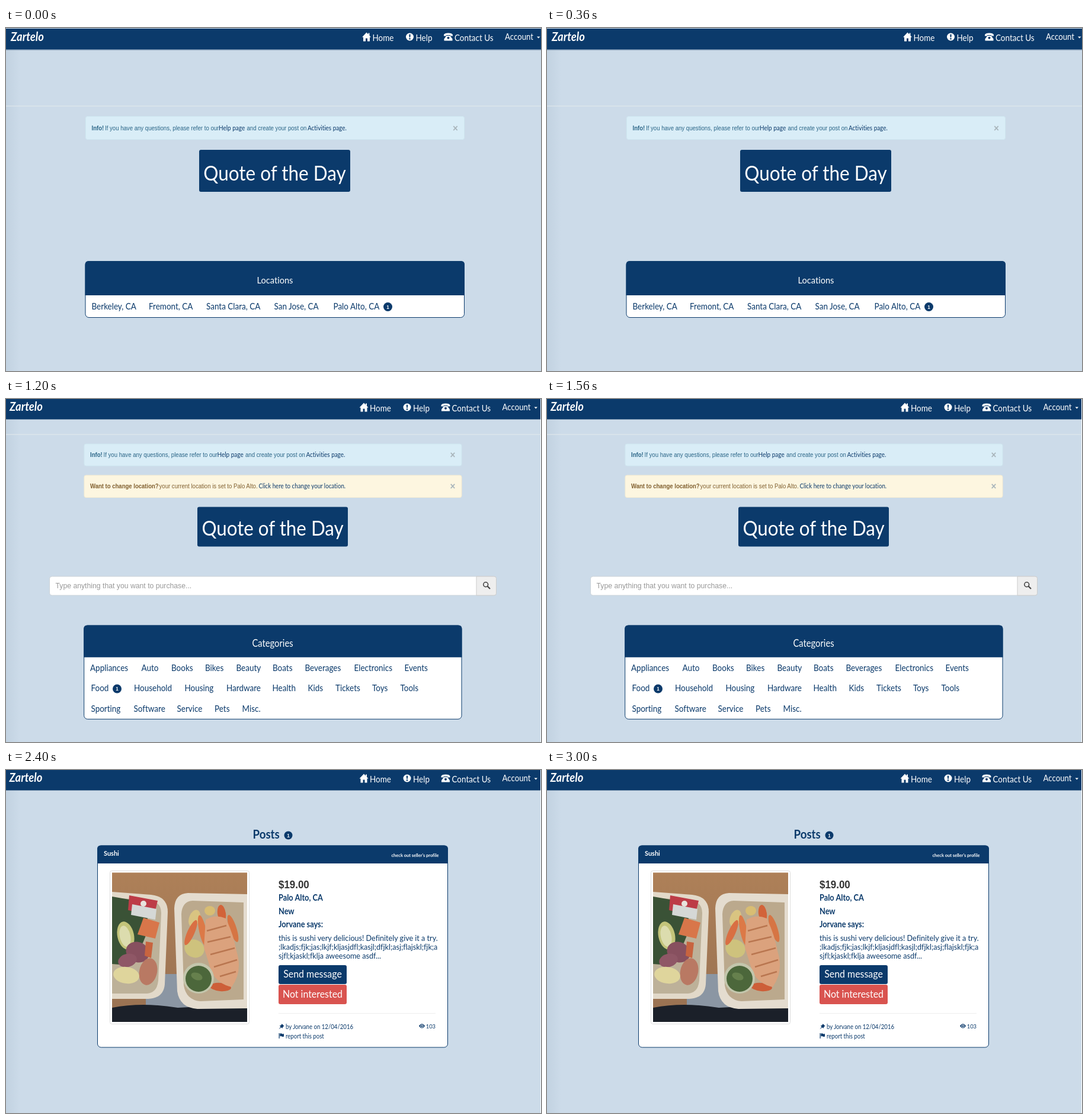
Write an HTML page that moves like this. It is 903 by 580 pixels and loops after 3.4 s.

```html
<!DOCTYPE html>
<html lang="en">
<head>
<meta charset="utf-8">
<title>Zartelo</title>
<style>
  html, body { margin: 0; width: 100%; height: 100%; overflow: hidden; background: #ccdbe9; }
  svg { display: block; width: 100%; height: 100%; }
  text { font-family: Lato, "Open Sans", sans-serif; font-variant-ligatures: none; white-space: pre; }
  .sans { font-family: "Liberation Sans", Arial, sans-serif; }
  .bold { font-weight: 700; }
  .brand { font-weight: 700; font-style: italic; }
  .mid { text-anchor: middle; }
  .end { text-anchor: end; }
  .scene { visibility: hidden; animation: turn 3400ms step-end infinite; }
  .scene.long { animation-name: long-turn; }
  @keyframes turn { 0% { visibility: visible; } 17.647%, 100% { visibility: hidden; } }
  @keyframes long-turn { 0% { visibility: visible; } 29.412%, 100% { visibility: hidden; } }
</style>
</head>
<body>
<svg id="stage" viewBox="0 0 903 580" preserveAspectRatio="none">
  <defs>
    <linearGradient id="shade">
      <stop offset="0" stop-color="#5f7890" stop-opacity=".09"/>
      <stop offset="1" stop-color="#5f7890" stop-opacity="0"/>
    </linearGradient>
    <linearGradient id="wood" x2="0" y2="1">
      <stop offset="0" stop-color="#ae8058"/>
      <stop offset="1" stop-color="#987152"/>
    </linearGradient>
    <clipPath id="photo"><rect x="179" y="173.5" width="228" height="252.5"/></clipPath>
  </defs>
</svg>
<script>
const NAVY = '#0b3a6b', WHITE = '#fff';
const SQUEEZE = 0.9; // the whole page is seen slightly narrowed

const rect = (x, y, w, h, fill, extra = '') =>
  `<rect x="${x}" y="${y}" width="${w}" height="${h}" fill="${fill}" ${extra}/>`;
const circle = (x, y, r, fill) => `<circle cx="${x}" cy="${y}" r="${r}" fill="${fill}"/>`;
const path = (d, fill, extra = '') => `<path d="${d}" fill="${fill}" ${extra}/>`;
const oval = (x, y, rx, ry, fill, turn = 0) =>
  `<ellipse rx="${rx}" ry="${ry}" fill="${fill}" transform="translate(${x} ${y}) rotate(${turn})"/>`;
const at = (x, y, body) => `<g transform="translate(${x} ${y})">${body}</g>`;
const text = (x, y, size, str, fill = NAVY, cls = '') =>
  `<text transform="translate(${x} ${y}) scale(${SQUEEZE} 1)" font-size="${size}" fill="${fill}" class="${cls}">${str}</text>`;
const words = (y, list, fill) => list.map(([x, str]) => text(x, y, 15, str, fill)).join('');
const badge = (x, y, r = 7.5) => circle(x, y, r, NAVY) + text(x, y + 3.2, 9, '1', WHITE, 'sans bold mid');

const house = path('M0 8L7.5 0L10.5 3.2V1H12.5V5.3L15 8H13V15H9V10H6V15H2V8Z', WHITE);
const notice = circle(6.5, 6.5, 6.5, WHITE) + path('M5.2 2.2H7.8L7.3 7.6H5.7Z', NAVY) + circle(6.5, 9.8, 1.3, NAVY);
const phone = path('M0 5V3Q1 0 7.5 0T15 3V5H11V3.5H4V5Z', WHITE) +
  path('M4.5 4.5H10.5L14.5 10V13H.5V10Z', WHITE) + circle(7.5, 8.3, 2, NAVY);
const lens = '<circle cx="4.7" cy="4.7" r="3.9" fill="none" stroke="#444" stroke-width="1.6"/>' +
  path('M7.5 7.5L12 12', 'none', 'stroke="#444" stroke-width="2.1"');
const pin = path('M5 0L9 4L7.8 4.6L6.3 6.6L6 8L4 6.2L0 9.5L3 5.2L1.2 3.2L3 3L4.8 1.3Z', NAVY);
const flag = path('M0 0H1.2V9H0ZM1.8 .8Q3.5 -.2 5.2 .9T8.5 .8V5.5Q7 6.5 5.2 5.5T1.8 5.5Z', NAVY);
const eye = path('M0 4Q5 -3.5 10 4Q5 11 0 4Z', NAVY) + circle(5, 4, 2.5, WHITE) + circle(5, 4, 1.6, NAVY);

// dx and dy shift the menu, brand holds the title's x and baseline
const page = ({ bar, dx, dy, brand, line, edge }) =>
  rect(0, 0, 903, 580, '#ccdbe9') +
  rect(0, bar, 24, 580 - bar, 'url(#shade)') +
  rect(0, 0, 903, bar, NAVY) + rect(0, bar, 903, 1, '#7892ad') +
  (edge ? rect(0, 0, 903, 1, '#dbe5ee') : rect(902, 0, 1, 580, WHITE)) +
  (line ? rect(0, line, 903, 1, '#e6ebee') : '') +
  text(...brand, 20.5, 'Zartelo', WHITE, 'brand') +
  at(dx, dy,
    at(601, 7.5, house) + text(618.5, 22, 15, 'Home', WHITE) +
    at(675, 8.5, notice) + text(691.5, 22, 15, 'Help', WHITE) +
    at(739, 8.5, phone) + text(757, 22, 15, 'Contact Us', WHITE) +
    text(842, 20, 14.7, 'Account', WHITE) + path('M896 14.5H901.5L898.75 17.5Z', WHITE));

const alertBox = (x, y, w, h, fill, border, body) =>
  rect(x + .5, y + .5, w - 1, h - 1, fill, `rx="3" stroke="${border}"`) +
  at(x, y + h / 2 + 3.5, body + text(w - 15.5, 2, 17, '×', '#a9b5bb', 'sans bold mid'));

const info = (x, y, w, h) => {
  const ink = '#2a6587';
  return alertBox(x, y, w, h, '#d9edf7', '#cfe7f0',
    text(10.5, 0, 10.6, 'Info!', ink, 'sans bold') +
    text(33, 0, 10.7, 'If you have any questions, please refer to our', ink, 'sans') +
    text(225, 0, 11.1, 'Help page') +
    text(272.5, 0, 10.7, 'and create your post on', ink, 'sans') +
    text(375, 0, 11, 'Activities page.'));
};

const change = (x, y, w, h) => {
  const ink = '#80602f';
  return alertBox(x, y, w, h, '#fdf6e0', '#f5ecd2',
    text(10.5, 0, 10.6, 'Want to change location?', ink, 'sans bold') +
    text(127, 0, 10.7, 'your current location is set to Palo Alto.', ink, 'sans') +
    text(295, 0, 10.8, 'Click here to change your location.'));
};

const quote = (x, y, w, h, base, size) =>
  rect(x, y, w, h, NAVY, 'rx="3"') +
  text(x + w / 2, base, size, 'Quote of the Day', WHITE, 'mid');

const panel = (x, y, w, h, head) =>
  rect(x + .5, y + .5, w - 1, h - 1, WHITE, `rx="6" stroke="${NAVY}"`) +
  path(`M${x} ${y + head}V${y + 6}q0 -6 6 -6H${x + w - 6}q6 0 6 6V${y + head}Z`, NAVY);

const cities = [[144.5, 'Berkeley, CA'], [241, 'Fremont, CA'], [338, 'Santa Clara, CA'], [452.5, 'San Jose, CA']];

const search = (x, y, w, h, str, ink) =>
  rect(x + .5, y + .5, w - 1, h - 1, WHITE, 'rx="4" stroke="#ccd3d8"') +
  path(`M794 ${y + .5}H824q3.5 0 3.5 3.5V${y + h - 4}q0 3.5 -3.5 3.5H794Z`, '#eee', 'stroke="#ccc"') +
  text(x + 10.5, y + h / 2 + 4.3, 13.6, str, ink, 'sans') +
  at(805, y + h / 2 - 7, lens);

const categories = () =>
  panel(131.2, 382.6, 638.3, 159.2, 54.2) +
  text(450, 419, 16.4, 'Categories', WHITE, 'mid') +
  words(460, [[142, 'Appliances'], [228.5, 'Auto'], [279, 'Books'], [336, 'Bikes'], [388.5, 'Beauty'],
    [450, 'Boats'], [504.5, 'Beverages'], [587.5, 'Electronics'], [672.5, 'Events']]) +
  words(494, [[143.5, 'Food'], [216, 'Household'], [301.5, 'Housing'], [372, 'Hardware'], [449.5, 'Health'],
    [509.5, 'Kids'], [556, 'Tickets'], [618, 'Toys'], [665.5, 'Tools']]) +
  badge(187.5, 490) +
  words(528.5, [[143.5, 'Sporting'], [215.5, 'Software'], [288.5, 'Service'], [352, 'Pets'], [398.5, 'Misc.']]);

const lunch = () => `<g clip-path="url(#photo)">` +
  rect(179, 173, 228, 254, 'url(#wood)') +
  path('M236 345H310V404H236Z', '#8b96a3') +
  path('M179 402Q230 392 290 402L407 396V427H179Z', '#1b2029') +
  // left tray
  path('M179 206L245 211Q273 214 273 240L268 362Q266 386 240 387H179Z', '#e2d9c9') +
  path('M179 216L240 220Q262 222 262 242L257 356Q255 377 238 378H179Z', '#bdb199') +
  path('M179 214L225 222Q250 250 232 290T205 330L179 328Z', '#3a5236') +
  path('M208 212L256 221L250 246L206 237Z', '#bd3c47') +
  path('M213 227L254 235L252 253L211 245Z', '#d5d8d6') + circle(232, 226, 5, '#e8e3dd') +
  oval(202, 280, 14, 24, '#c3c47a', -12) + oval(201, 281, 9, 18, '#dcdcae', -12) +
  path('M232 250L259 258L252 285L222 278Z', '#d8764a') +
  oval(222, 308, 20, 17, '#87505f', 25) + oval(205, 322, 16, 11, '#8f5766', -15) +
  oval(240, 341, 15, 23, '#b97963', 12) + oval(203, 347, 22, 14, '#dfd59c', 8) +
  path('M236 290L248 292L245 318L234 314Z', '#c8643f') +
  // right tray
  path('M307 208L407 210V403L323 404Q293 402 289 374L284 234Q285 209 307 208Z', '#e4dccf') +
  path('M315 221L401 224V388L328 391Q304 389 300 364L296 244Q297 222 315 221Z', '#bba98d') +
  oval(318, 251, 9, 15, '#d9c481', 20) + oval(344, 238, 9, 8, '#d8bd73') + oval(318, 302, 17, 15, '#cec27d', 25) +
  oval(312, 275, 6, 23, '#d96f43', 24) + oval(332, 272, 6, 27, '#dc7947', -12) +
  oval(364, 243, 7, 15, '#d26339', -8) + oval(383, 268, 6, 24, '#d67544', -18) +
  oval(362, 367, 18, 7, '#cd5e38', 5) +
  path('M337 253Q354 243 371 251Q384 278 389 306Q400 340 381 367Q358 362 347 342L334 300Z', '#dba27d') +
  path('M339 272L372 263M340 291L379 282M345 312L386 301M351 333L390 321M361 349L388 341', 'none',
    'stroke="#b97650" stroke-width="2.5"') +
  circle(325, 352, 26, '#c3c6ac') + circle(325, 353, 22, '#4c673b') + oval(322, 349, 10, 6, '#66804d', 20) +
  '</g>';

const post = () =>
  text(416.5, 116, 20.8, 'Posts', NAVY, 'bold') + badge(476.5, 110.5, 7) +
  panel(154, 127.5, 592, 342, 30.5) +
  text(165, 145, 12.2, 'Sushi', WHITE, 'bold') +
  text(730.5, 147, 8.3, "check out seller's profile", WHITE, 'bold end') +
  rect(175.5, 170.5, 235, 259, WHITE, 'rx="3" stroke="#ddd"') + lunch() +
  text(460, 200, 18.8, '$19.00', '#333', 'sans bold') +
  text(460, 221, 14.2, 'Palo Alto, CA', NAVY, 'bold') +
  text(460, 244, 14.2, 'New', NAVY, 'bold') +
  text(460, 266, 14.2, 'Jorvane says:', NAVY, 'bold') +
  ['this is sushi very delicious! Definitely give it a try.',
    ';lkadjs;fjk;jas;lkjf;kljasjdfl;kasjl;dfjkl;asj;flajskl;fjk;a',
    'sjfl;kjaskl;fklja aweesome asdf...'].map((str, i) => text(460, 288.5 + 15 * i, 14, str)).join('') +
  rect(460, 330, 115, 32, NAVY, 'rx="3"') + text(517.5, 351, 17.7, 'Send message', WHITE, 'mid') +
  rect(460, 363, 115, 33, '#d9534f', 'rx="3"') + text(517.5, 385, 17.7, 'Not interested', WHITE, 'mid') +
  rect(460, 411, 265, 1, '#eee') +
  at(460.5, 429, pin) + text(472, 438, 10.7, 'by Jorvane on 12/04/2016') +
  at(697, 429, eye) + text(725, 437, 10.4, '103', NAVY, 'end') +
  at(460.5, 445, flag) + text(472, 454, 10.7, 'report this post');

const scenes = [
  page({ bar: 36.5, dx: 0, dy: 0, brand: [8, 21.5], line: 131.5, edge: true }) +
    info(134, 149, 640, 40) +
    quote(326, 206, 255, 71, 257.5, 35) +
    panel(133.5, 394, 640.5, 96, 58) +
    text(454, 432, 16.2, 'Locations', WHITE, 'mid') +
    words(476, [...cities, [552.5, 'Palo Alto, CA']]) + badge(644.5, 471.5),

  page({ bar: 35.5, dx: -4, dy: 0, brand: [6, 21], line: 126.5, edge: true }) +
    info(132, 142, 638, 39) +
    quote(324, 197, 254, 68, 246.5, 34.8) +
    panel(131.5, 377, 638.5, 91.5, 55) +
    text(451, 413.5, 16.2, 'Locations', WHITE, 'mid') +
    at(-2.2, 0, words(455, cities)) +
    rect(539, 432.5, 119, 35.5, NAVY, 'rx="3"') +
    words(455, [[549, 'Palo Alto, CA']], WHITE) + badge(641, 451.5),

  page({ bar: 34, dx: -4.5, dy: -1, brand: [6, 20], line: 59.5 }) +
    info(131.5, 75.5, 638, 38) +
    change(131.5, 128.5, 638, 38.5) +
    quote(323, 182.5, 254, 67, 231, 34.8) +
    search(73, 299.5, 755, 33, 'Type anything that you want to purchase...', '#999') +
    categories(),

  page({ bar: 34.5, dx: -4, dy: -1, brand: [7, 20.5], edge: true }) +
    info(132.5, 52, 637.5, 38) +
    change(132.5, 105.5, 637.5, 38.5) +
    quote(324, 159.5, 254, 67, 208, 34.8) +
    search(74.5, 277.5, 754, 32.5, 'sushi', '#555') +
    at(1, -22, categories()),

  page({ bar: 34, dx: -4.5, dy: -1, brand: [5.5, 20] }) + post()
];

document.getElementById('stage').insertAdjacentHTML('beforeend', scenes.map((body, i) =>
  `<g class="scene${i === 4 ? ' long' : ''}" style="animation-delay:${600 * i - (i && 3400)}ms">${body}</g>`).join(''));
</script>
</body>
</html>
```
